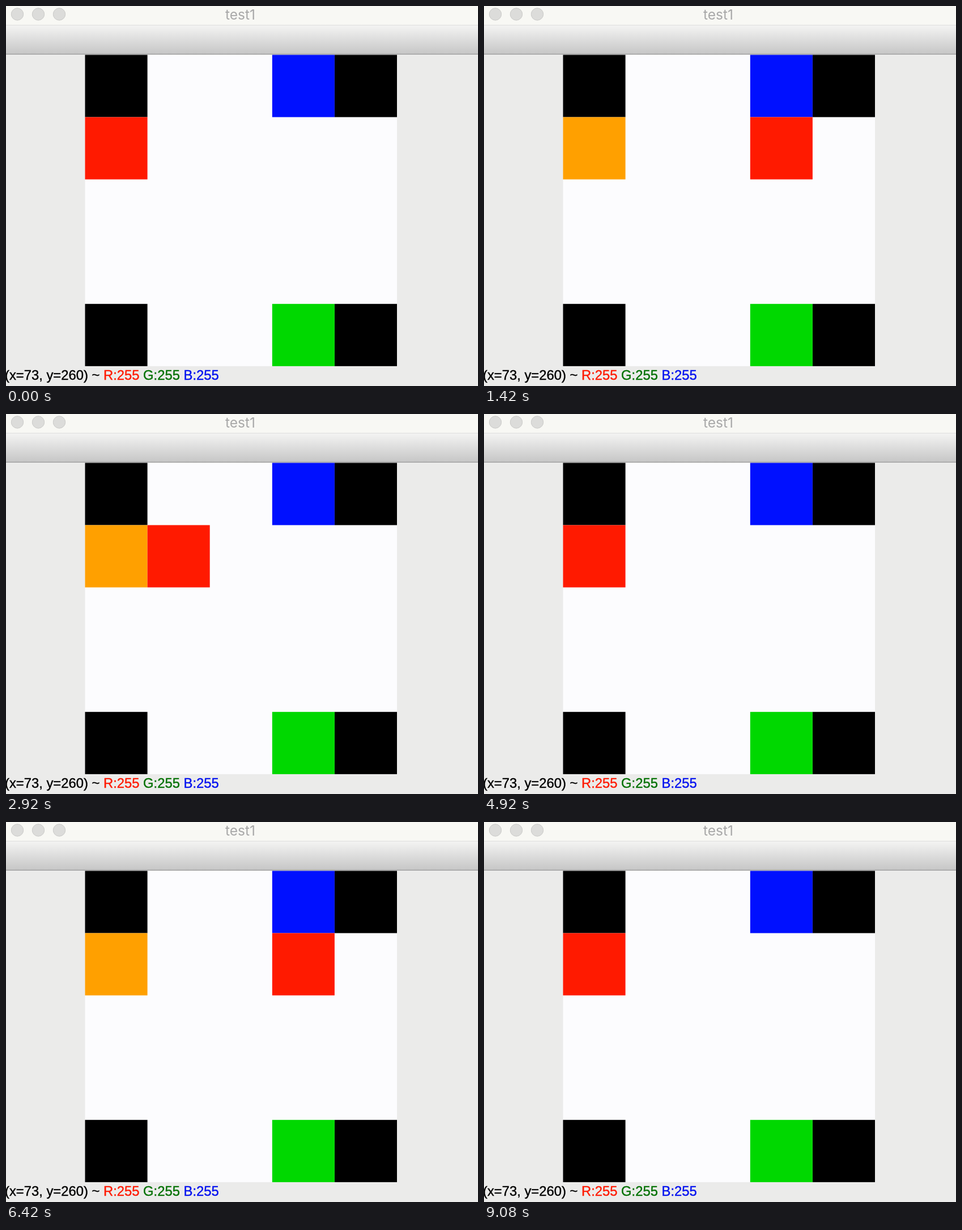
An HTML page with a canvas for the animation above (9180 ms loop, 833 by 672 pixels).

```html
<!DOCTYPE html>
<html lang="en">
<head>
<meta charset="utf-8">
<title>Grid walk</title>
<style>
  html, body { margin: 0; width: 100%; height: 100%; overflow: hidden; background: #ebebea; }
  canvas { display: block; }
</style>
</head>
<body>
<canvas id="stage" width="833" height="672"></canvas>
<script>
const ctx = document.getElementById('stage').getContext('2d');
const LOOP = 9180;
const LEFT = 139.5, TOP = 86.4, CELL = 110.1, SIZE = 5;

// The walker leaves home twice per loop, one cell per step.
const TRIPS = [40, 4940];
const STEP = 600;
const PATH = [1, 2, 3, 2, 1];
const HOME_ROW = 1;

function fill(color, x, y, w, h) {
  ctx.fillStyle = color;
  ctx.fillRect(x, y, w, h);
}

function cell(col, row, color) {
  fill(color, LEFT + col * CELL, TOP + row * CELL, CELL, CELL);
}

function vertical(y0, y1, from, to) {
  const g = ctx.createLinearGradient(0, y0, 0, y1);
  g.addColorStop(0, from);
  g.addColorStop(1, to);
  fill(g, 0, y0, 833, y1 - y0);
}

function drawWindow() {
  fill('#ebebea', 0, 0, 833, 672);
  fill('#f8f8f4', 0, 0, 833, 34);
  vertical(34, 85, '#f4f4f3', '#c6c6c6');
  fill('#dcdcdc', 0, 33.5, 833, 1);
  fill('#a3a3a3', 0, 84.5, 833, 1.5);

  for (const x of [20, 57, 94]) {
    ctx.beginPath();
    ctx.arc(x, 14.5, 10.7, 0, Math.PI * 2);
    ctx.fillStyle = '#dcdcda';
    ctx.fill();
    ctx.strokeStyle = '#cacac8';
    ctx.lineWidth = 1;
    ctx.stroke();
  }

  ctx.font = '24.5px Inter, "Open Sans", sans-serif';
  ctx.textAlign = 'center';
  ctx.fillStyle = '#a8a8a8';
  ctx.fillText('test1', 413.5, 24);
}

function drawStatus() {
  ctx.font = '23.8px "Liberation Sans", Arial, sans-serif';
  ctx.textAlign = 'left';
  ctx.lineWidth = 0.4;
  let x = -2;
  const parts = [
    ['(x=73, y=260) ~ ', '#000'],
    ['R:255 ', '#ff1a00'],
    ['G:255 ', '#007000'],
    ['B:255', '#0010f0']
  ];
  for (const [text, color] of parts) {
    ctx.fillStyle = ctx.strokeStyle = color;
    ctx.fillText(text, x, 661);
    ctx.strokeText(text, x, 661);
    x += ctx.measureText(text).width;
  }
}

function walkerColumn(t) {
  for (const start of TRIPS) {
    const i = Math.floor((t - start) / STEP);
    if (i >= 0 && i < PATH.length) return PATH[i];
  }
  return 0;
}

function drawGrid(t) {
  fill('#fcfcfe', LEFT, TOP, SIZE * CELL, SIZE * CELL);
  for (const col of [0, 4]) {
    for (const row of [0, 4]) cell(col, row, '#000');
  }
  cell(3, 0, '#0010ff');
  cell(3, 4, '#00d800');
  const col = walkerColumn(t);
  if (col > 0) cell(0, HOME_ROW, '#ffa000');
  cell(col, HOME_ROW, '#ff1a00');
}

let origin = null;
function frame(now) {
  if (origin === null) origin = now;
  drawWindow();
  drawGrid((now - origin) % LOOP);
  drawStatus();
  requestAnimationFrame(frame);
}
requestAnimationFrame(frame);
</script>
</body>
</html>
```
